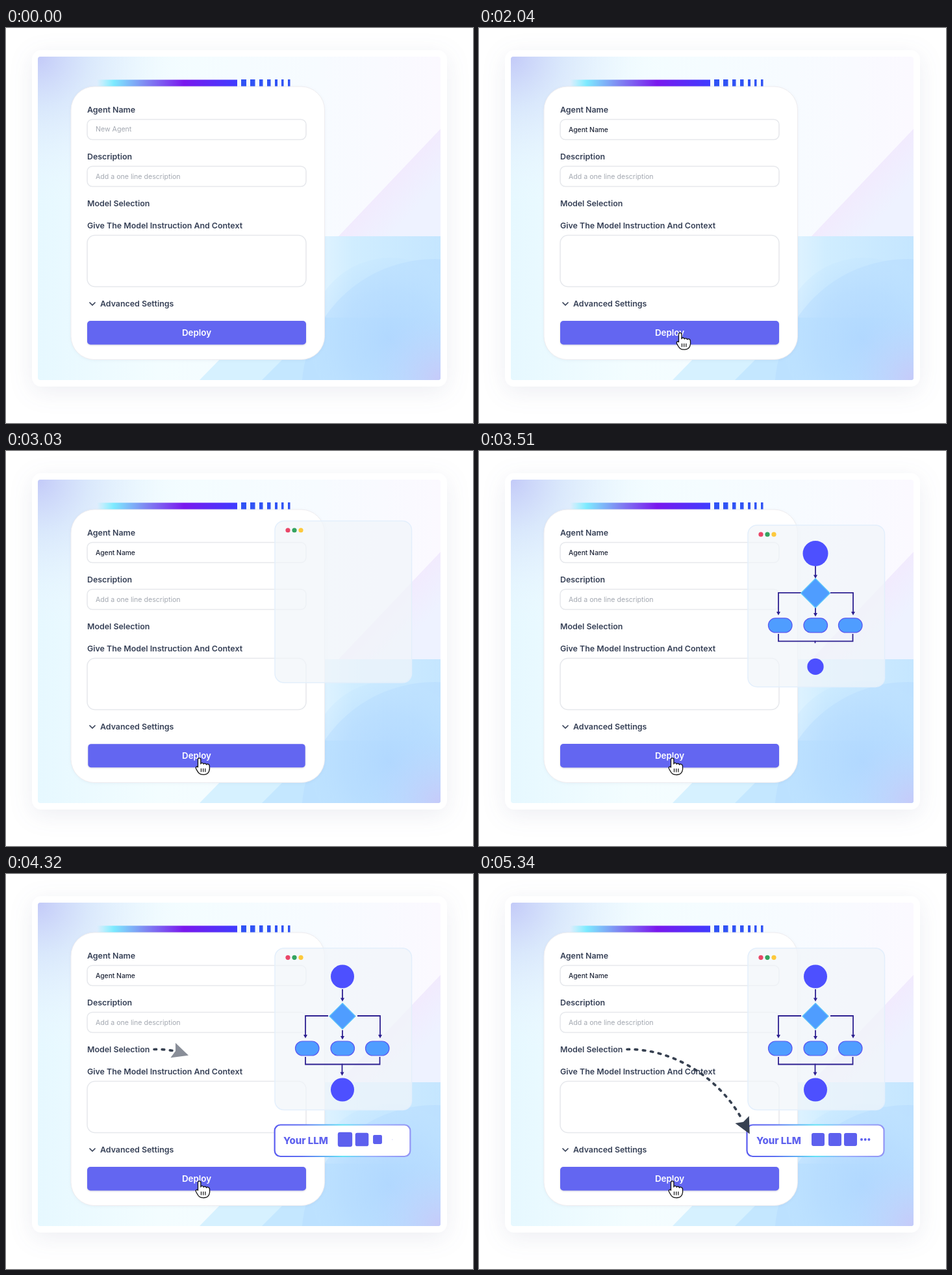
These frames come from a looping animation (719x607 px, 5.4 s). An HTML page:

```html
<!DOCTYPE html>
<html lang="en">
<head>
<meta charset="utf-8">
<title>Deploy an agent</title>
<style>
  html, body { margin: 0; width: 100%; height: 100%; overflow: hidden; background: #fff; }
  svg { display: block; width: 100vw; height: 100vh; font-family: Inter, "Open Sans", sans-serif; }
  .label { font-size: 12.4px; font-weight: 600; fill: #374157; }
  .hint { font-size: 10.6px; fill: #a3a8b1; }
  .field { fill: #fff; stroke: #e6e8ec; stroke-width: 1.5; }
  .pop { transform-box: fill-box; transform-origin: center; }
  .node { fill: #4d50ff; }
  .step { fill: #4f9dff; stroke: #5a58f0; stroke-width: 1.2; }
  .wire { fill: none; stroke: #2e2191; stroke-width: 1.8; stroke-dasharray: 1 2; }
  .icon { fill: #5d60ee; }
  #typed { font-size: 10.3px; font-weight: 500; fill: #1f2638; white-space: pre; }
  #button { transform-origin: 293.5px 468px; }
</style>
</head>
<body>
<svg viewBox="0 0 719 607" preserveAspectRatio="none">
  <defs>
    <clipPath id="scene"><rect x="49" y="44" width="620" height="497" rx="4"/></clipPath>
    <linearGradient id="base">
      <stop stop-color="#e6f8ff"/><stop offset=".3" stop-color="#f3fdff"/>
      <stop offset=".7" stop-color="#f7fbff"/><stop offset="1" stop-color="#fbf9ff"/>
    </linearGradient>
    <radialGradient id="corner" gradientUnits="userSpaceOnUse" cx="49" cy="44" r="230">
      <stop stop-color="#c3caf8"/><stop offset=".35" stop-color="#d6e4fb" stop-opacity=".8"/>
      <stop offset="1" stop-color="#eef9ff" stop-opacity="0"/>
    </radialGradient>
    <linearGradient id="facet" x1="0" y1="0" x2="1" y2="1">
      <stop offset=".4" stop-color="#f3e8fd"/><stop offset=".75" stop-color="#eef2ff"/>
    </linearGradient>
    <linearGradient id="water">
      <stop stop-color="#d3f0ff" stop-opacity="0"/><stop offset=".5" stop-color="#d0edff"/>
      <stop offset="1" stop-color="#c5e6ff"/>
    </linearGradient>
    <radialGradient id="deep">
      <stop stop-color="#acd4ff"/><stop offset=".6" stop-color="#b5dbff" stop-opacity=".8"/>
      <stop offset="1" stop-color="#bfe3ff" stop-opacity=".35"/>
    </radialGradient>
    <radialGradient id="violet" gradientUnits="userSpaceOnUse" cx="669" cy="541" r="110">
      <stop stop-color="#c6caf9"/><stop offset="1" stop-color="#b9d8ff" stop-opacity="0"/>
    </radialGradient>
    <linearGradient id="ribbon">
      <stop stop-color="#7df0ff" stop-opacity="0"/><stop offset=".12" stop-color="#7ceaff"/>
      <stop offset=".35" stop-color="#7f86f2"/><stop offset=".62" stop-color="#7a18ee"/>
      <stop offset="1" stop-color="#3f3cff"/>
    </linearGradient>
    <linearGradient id="rim">
      <stop stop-color="#5a5cf0"/><stop offset=".2" stop-color="#5f70f2"/>
      <stop offset=".5" stop-color="#62e2f5"/><stop offset=".72" stop-color="#9bb0fb"/>
      <stop offset="1" stop-color="#9294f5"/>
    </linearGradient>
  </defs>

  <rect x="40" y="34" width="639" height="517" rx="14" fill="#fff" style="filter:drop-shadow(0 8px 18px rgba(60,70,120,.09))"/>
  <g clip-path="url(#scene)">
    <rect x="49" y="44" width="620" height="497" fill="url(#base)"/>
    <rect x="49" y="44" width="620" height="497" fill="url(#corner)"/>
    <path d="M669 155L511 321H669z" fill="url(#facet)"/>
    <rect x="400" y="320" width="269" height="221" fill="url(#water)"/>
    <path d="M298 541L340 498H490V541z" fill="#d6f1ff"/>
    <path d="M394 541L490 445H669V541z" fill="#c4e7ff"/>
    <circle cx="660" cy="560" r="205" fill="#b5dcff" opacity=".5"/>
    <circle cx="592" cy="478" r="125" fill="url(#deep)" opacity=".7"/>
    <rect x="540" y="420" width="129" height="121" fill="url(#violet)"/>
  </g>

  <rect x="140" y="79.5" width="216" height="12" fill="url(#ribbon)"/>
  <path d="M362 79h8v12h-8zm14 0h7.500v12h-7.500zm14 0h5.500v12h-5.500zm12 0h5.500v12h-5.500zm12 0h4v12h-4zm10 0h3.500v12h-3.500zm10 0h3.500v12h-3.500z" fill="#3053f5"/>
  <rect x="100" y="90" width="390.500" height="419.500" rx="36" fill="#fff" stroke="#eeecef" style="filter:drop-shadow(0 1px 2px rgba(70,80,130,.06))"/>

  <g class="label">
    <text x="125" y="130">Agent Name</text>
    <text x="125" y="202">Description</text>
    <text x="125" y="274">Model Selection</text>
    <text x="125" y="308">Give The Model Instruction And Context</text>
    <text x="145" y="428">Advanced Settings</text>
  </g>
  <path d="M129 422l4 4 4-4" fill="none" stroke="#374157" stroke-width="1.700" stroke-linecap="round" stroke-linejoin="round"/>
  <rect class="field" x="125" y="140.500" width="337" height="31" rx="8"/>
  <rect class="field" x="125" y="212.500" width="337" height="31" rx="8"/>
  <rect class="field" x="125" y="318.500" width="337" height="79" rx="12"/>
  <text class="hint" id="hint" x="138" y="159">New Agent</text>
  <text class="hint" x="138" y="232">Add a one line description</text>
  <text id="typed" x="138" y="159.500"></text>
  <rect id="caret" y="151" width="1" height="10" fill="#1f2638"/>

  <g id="panel">
    <rect x="414" y="114" width="210.500" height="248.500" rx="14" fill="#f2f5fa" fill-opacity=".72" stroke="#e3effc" stroke-width="1.500"/>
    <circle cx="434" cy="128.300" r="3.600" fill="#ea4668"/>
    <circle cx="444" cy="128.300" r="3.600" fill="#34a460"/>
    <circle cx="454" cy="128.300" r="3.600" fill="#fdc93c"/>
    <g id="wires"></g>
    <circle class="pop node" data-at="3200" cx="518" cy="157.500" r="18"/>
    <path class="pop" data-at="3272" d="M518 198.500L538 218.500 518 238.500 498 218.500z" fill="#4f9dff" stroke="#5cc6fa" stroke-width="1.200"/>
    <rect class="pop step" data-at="3360" x="445.500" y="257" width="36.500" height="22" rx="11"/>
    <rect class="pop step" data-at="3360" x="500" y="257" width="36.500" height="22" rx="11"/>
    <rect class="pop step" data-at="3360" x="553.500" y="257" width="36.500" height="22" rx="11"/>
    <circle class="pop node" data-at="3423" cx="518" cy="331.500" r="18"/>
  </g>

  <rect class="pop" data-at="3782" data-axis="X" x="412.500" y="385.500" width="211" height="48.500" rx="9" fill="#fff" stroke="url(#rim)" stroke-width="2.200"/>
  <text id="llm" x="427" y="415" font-size="15" font-weight="800" fill="#5f62ee">Your LLM</text>
  <g class="icon">
    <rect class="pop" data-at="3970" data-slow="1.45" x="512" y="398" width="20" height="20" rx="3"/>
    <rect class="pop" data-at="4090" data-slow="1.45" x="538" y="398" width="20" height="20" rx="3"/>
    <rect class="pop" data-at="4195" data-slow="1.45" x="562" y="398" width="20" height="20" rx="3"/>
    <g class="pop" data-at="4305" data-slow="1.45">
      <circle cx="589" cy="408" r="2"/><circle cx="594.700" cy="408" r="2"/><circle cx="600.400" cy="408" r="2"/>
    </g>
  </g>

  <path id="trail" d="M228 269.500C300 268 373 315 407 381" fill="none" stroke="#374151" stroke-width="3.700" stroke-linecap="round"/>
  <path id="head" d="M21 0L-4-12 0 0-4 12z" fill="#374151"/>

  <g id="button">
    <rect x="125" y="450" width="337" height="36.500" rx="5" fill="#6366f1" style="filter:drop-shadow(0 1px 1px rgba(40,40,90,.2))"/>
    <text x="293.500" y="473" text-anchor="middle" font-size="13.400" font-weight="600" fill="#fff">Deploy</text>
    <g id="cursor">
      <path d="M4.500 15V3a2.200 2.200 0 0 1 4.400 0v7c0-2.200 4-2.200 4.400.3.600-1.600 3.800-1.500 4.200.8.800-1.500 4.500-1.200 4.900 1.600.9 6-.2 13.300-8.400 13.800C5 27 4.500 22 1.600 17.500.3 15 2.500 13 4.500 15z" fill="#fff" stroke="#111" stroke-width="1.300" stroke-linejoin="round"/>
      <path d="M9.500 17v5.500M12.700 17v5.500M15.900 17v5.500" stroke="#111" stroke-width="1.200"/>
    </g>
  </g>
</svg>
<script>
const LOOP = 5400, NAME = 'Agent Name';
const $ = id => document.getElementById(id);
const clamp = (v, hi = 1) => Math.max(0, Math.min(hi, v));
const span = (t, start, length) => clamp((t - start) / length);
const easeOut = (u, power) => 1 - (1 - u) ** power;
const spring = x => x <= 0 ? 0 : 1 - Math.exp(-x / 125) * Math.cos(x * Math.PI / 300);

// Connectors: start time, line, arrow tip (if any)
const wires = [
  [3230, 'M518 177V194', [518, 196]],
  [3310, 'M496 218H461V250', [461, 252.5]],
  [3310, 'M541 218H576V250', [576, 252.5]],
  [3310, 'M518 240V252', [518, 254.5]],
  [3390, 'M461 281V292.500H518'],
  [3390, 'M575.500 281V292.500H517'],
  [3490, 'M517.500 292V308', [517.5, 310]]
].map(([start, d, tip]) => {
  const add = (attrs) => {
    const el = document.createElementNS('http://www.w3.org/2000/svg', 'path');
    for (const key in attrs) el.setAttribute(key, attrs[key]);
    return $('wires').appendChild(el);
  };
  return {
    start,
    line: add({ d, class: 'wire', pathLength: 1 }),
    tip: tip && add({ d: `M${tip}l-3-5.500h6z`, fill: '#2e2191' })
  };
});
const pops = [...document.querySelectorAll('.pop')];
const trail = $('trail'), trailLength = trail.getTotalLength();

function drawTyping(t) {
  $('hint').style.opacity = t < 240 ? 1 : 0;
  $('typed').textContent = NAME.slice(0, clamp(Math.floor((t - 900) / 60), NAME.length));
  const on = (t >= 240 && t < 450) || (t >= 690 && t < 1500);
  $('caret').style.opacity = on ? 1 : 0;
  $('caret').setAttribute('x', 139.5 + $('typed').getComputedTextLength());
}

function drawButton(t) {
  const left = 1 - easeOut(span(t, 1500, 600), 1.6);
  $('cursor').setAttribute('transform', `translate(${291 + 491 * left} ${471 - 138 * left})`);
  const x = clamp(t - 2280, 1230);
  const scale = 1 - 0.0446 * (1 - x / 1230) * Math.sin(x * Math.PI / 350);
  $('button').style.transform = `scale(${scale})`;
}

function drawPanel(t) {
  $('panel').style.opacity = span(t, 2705, 130);
  $('panel').setAttribute('transform', `translate(0 ${92 * (1 - spring(t - 2705))})`);
  for (const { start, line, tip } of wires) {
    const p = span(t, start, 100);
    line.style.strokeDashoffset = 1 - p;
    line.style.opacity = p > 0 ? 1 : 0;
    if (tip) tip.style.opacity = p < 1 ? 0 : 1;
  }
}

function drawPops(t) {
  for (const el of pops) {
    const { at, slow = 1, axis = '' } = el.dataset;
    const s = spring((t - at) / slow);
    el.style.transform = `scale${axis}(${s})`;
    el.style.opacity = s > 0 ? 1 : 0;
  }
  const p = span(t, 3880, 245);
  $('llm').style.opacity = p;
  $('llm').setAttribute('y', 424 - 9 * p);
}

function drawTrail(t) {
  const visible = t > 4235, dash = 3.5, step = 12.2;
  const length = trailLength * easeOut(span(t, 4235, 1105), 2);
  const a = trail.getPointAtLength(Math.max(0, length - 2));
  const b = trail.getPointAtLength(length);
  const angle = length > 0 ? Math.atan2(b.y - a.y, b.x - a.x) * 180 / Math.PI : 0;
  // The head leans ahead of the curve at first
  const lean = 10 * (1 - length / trailLength);
  const body = Math.max(0, length - 4);
  trail.style.strokeDasharray = `${dash} ${step - dash} `.repeat(Math.floor(body / step)) +
    `${Math.min(dash, body % step)} 999`;
  trail.style.opacity = visible ? 1 : 0;
  $('head').style.opacity = span(t, 4235, 145);
  $('head').setAttribute('transform', `translate(${b.x} ${b.y}) rotate(${angle + lean})`);
}

function frame() {
  const t = performance.now() % LOOP;
  for (const draw of [drawTyping, drawButton, drawPanel, drawPops, drawTrail]) draw(t);
  requestAnimationFrame(frame);
}
frame();
</script>
</body>
</html>
```
